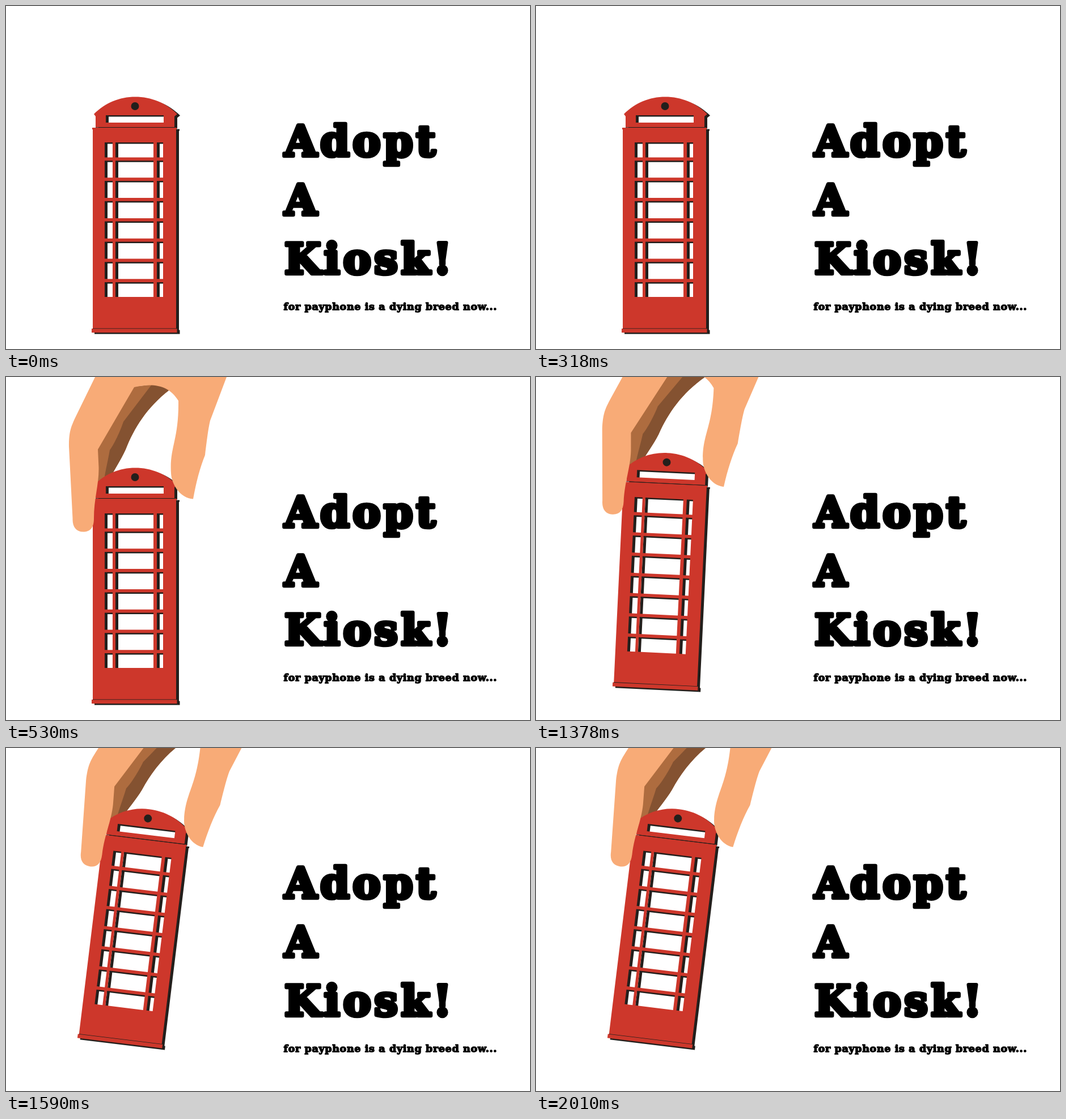
Recreate the animation shown at these times as an HTML page with a canvas. Size 924 px wide and 606 px high, loop 2290 ms.

```html
<!DOCTYPE html>
<html lang="en">
<head>
<meta charset="utf-8">
<title>Adopt A Kiosk!</title>
<style>
  html, body { margin: 0; width: 100%; height: 100%; overflow: hidden; background: #fff; }
  canvas { display: block; }
</style>
</head>
<body>
<canvas id="stage" width="924" height="606"></canvas>
<script>
const ctx = document.getElementById('stage').getContext('2d');
const RED = '#cd372b', INK = '#231f1c', SKIN = '#f8ab77', BROWN = '#ae6c3f', DARK = '#845231';
const LOOP = 2290, STEP = 530;

// The kiosk and the hand turn together about the top left window corner.
const PIVOT = { x: 174, y: 241 };
const POSES = [
  { x: 174, y: 241, turn: 0, hand: false },
  { x: 174, y: 241, turn: 0, hand: true },
  { x: 174, y: 212, turn: 2.75, hand: true },
  { x: 189.4, y: 181.5, turn: 6.95, hand: true }
];

function kioskPath() {
  const path = new Path2D(
    'M155 191C175 171 200 160.5 228 160.5C256 160.5 282 171 302 191' +
    'L297 195V214H158V195Z' +
    'M152 215H301V218H300V570H301.5V577H151V570H153V218H152Z');
  path.rect(176, 193, 102, 13);
  const columns = [[174, 188], [193, 260], [266, 277]];
  for (let row = 0; row < 8; row++) {
    const top = row ? 237.4 + row * 35.8 : 241;
    const bottom = row < 7 ? 267.5 + row * 35.8 : 514;
    for (const [left, right] of columns) path.rect(left, top, right - left, bottom - top);
  }
  return path;
}

const kiosk = kioskPath();
const innerHand = new Path2D(
  'M226 17L300 8L288 23C248 54 226 90 211 128C202 148 190 165 180 185L160 205V128Z');
const innerShade = new Path2D(
  'M258 12L300 8L288 23C248 54 226 90 211 128C202 148 190 165 180 185L172 190' +
  'C174 170 179 152 183 129C190 120 202 95 207 79Z');
const fingers = new Path2D(
  'M161 -8L122 72C114 89 111 98 111 123L117.5 250C117 265 124 273.5 136 273.5' +
  'C149 273.5 155 266 155 250C155 215 164 190 163.5 160L162 128L226 18' +
  'C258 11 286 13 304 42C305 112 288 124 291 170C292 190 307 214 330 215.5' +
  'C335 187 342 160 351 138C355 105 357 90 360 77L392 -8Z');

function fill(path, color, rule = 'nonzero') {
  ctx.fillStyle = color;
  ctx.fill(path, rule);
}

function drawKiosk() {
  ctx.save();
  ctx.translate(5, 2.5);
  fill(kiosk, INK, 'evenodd');
  ctx.restore();
  fill(kiosk, RED, 'evenodd');

  ctx.fillStyle = INK;
  ctx.fillRect(158, 214, 139, 0.8);
  ctx.fillRect(153, 569.5, 148, 0.8);
  ctx.beginPath();
  ctx.arc(227.5, 177, 7, 0, Math.PI * 2);
  ctx.fill();
}

// A round outline gives the letters their soft, heavy look.
function drawText(text, x, y, size, weight, spacing) {
  ctx.font = `bold ${size}px "DejaVu Serif", serif`;
  ctx.letterSpacing = `${spacing}px`;
  ctx.fillStyle = ctx.strokeStyle = '#000';
  ctx.lineJoin = 'round';
  ctx.lineWidth = weight;
  ctx.strokeText(text, x, y);
  ctx.fillText(text, x, y);
}

function draw(now) {
  const step = Math.min(3, Math.floor((now % LOOP) / STEP));
  const pose = POSES[step];
  ctx.fillStyle = '#fff';
  ctx.fillRect(0, 0, 924, 606);

  ctx.save();
  ctx.translate(pose.x, pose.y);
  ctx.rotate(pose.turn * Math.PI / 180);
  ctx.translate(-PIVOT.x, -PIVOT.y);
  if (pose.hand) {
    fill(innerHand, BROWN);
    fill(innerShade, DARK);
  }
  drawKiosk();
  if (pose.hand) fill(fingers, SKIN);
  ctx.restore();

  ['Adopt', 'A', 'Kiosk!'].forEach((word, line) =>
    drawText(word, 491, 264.5 + line * 104, 74, 6.5, 5.5));
  drawText('for payphone is a dying breed now...', 489.5, 537, 17.5, 1.5, 0.65);
}

const start = performance.now();
function tick() {
  draw(performance.now() - start);
  requestAnimationFrame(tick);
}
tick();
</script>
</body>
</html>
```
